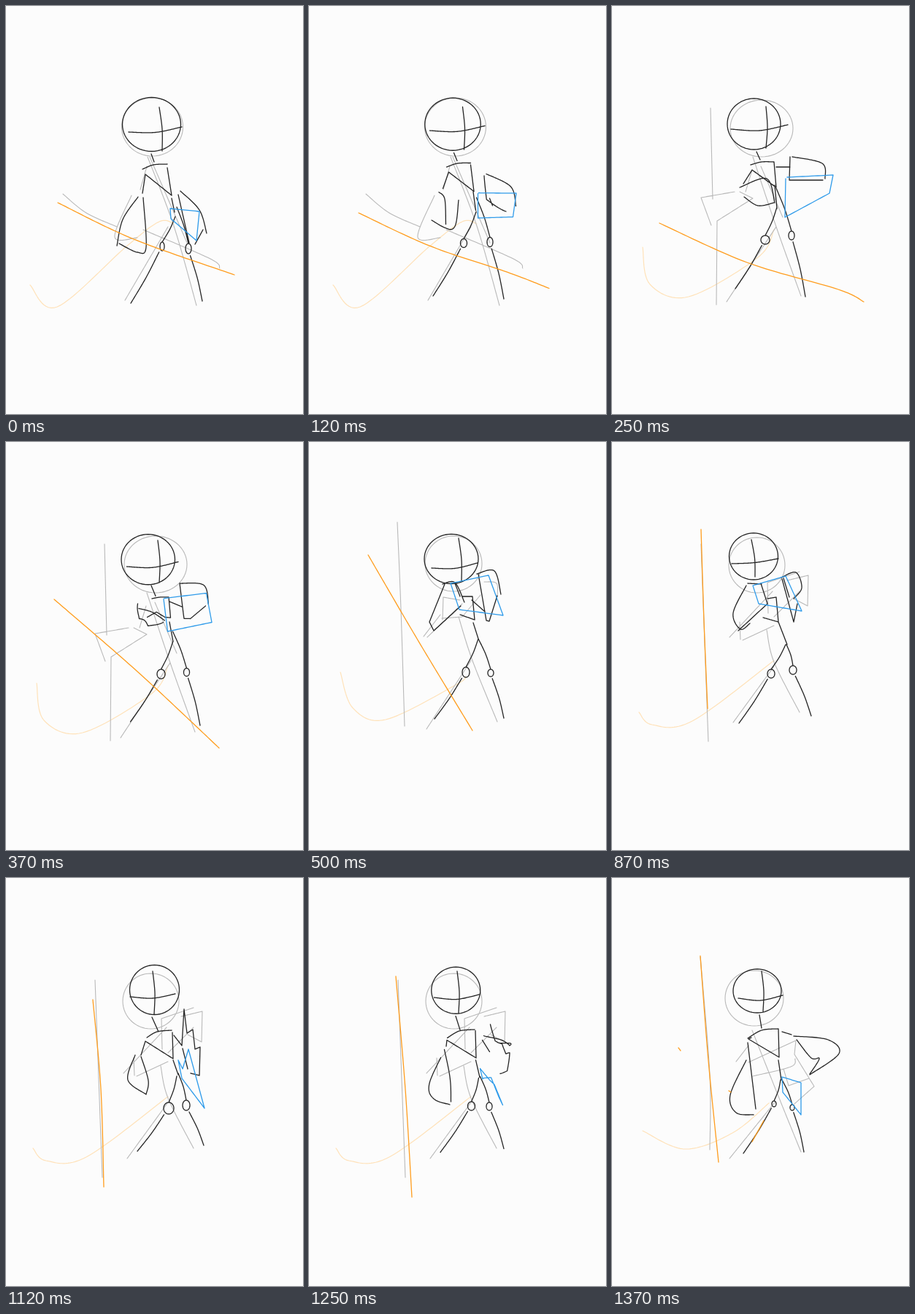
These frames come from a looping animation (407x560 px, 1620 ms). An HTML page with a canvas:

```html
<!DOCTYPE html>
<html lang="en">
<head>
<meta charset="utf-8">
<title>Walking sketch</title>
<style>
  html, body { margin: 0; width: 100%; height: 100%; overflow: hidden; background: #fcfcfc; }
  canvas { display: block; }
</style>
</head>
<body>
<canvas id="stage" width="407" height="560"></canvas>
<script>
const ctx = document.getElementById('stage').getContext('2d');
const LOOP = 1620;
const INK = '#242424', GREY = '#b9b9b9', ORANGE = '#ff9d1e', PALE = '#ffe2b9', BLUE = '#2f9bea';

// A stroke is a function that gives the point at u, from 0 to 1.
const mix = (a, b, t) => [a[0] + (b[0] - a[0]) * t, a[1] + (b[1] - a[1]) * t];

const ellipse = ([x, y, rx, ry]) => u =>
  [x + rx * Math.sin(u * 2 * Math.PI), y - ry * Math.cos(u * 2 * Math.PI)];

function along(points, straight) {
  const last = points.length - 1;
  return u => {
    const i = Math.min(Math.floor(u * last), last - 1), t = u * last - i;
    const p = k => points[Math.max(0, Math.min(last, k))];
    const [a, b, c, d] = [p(i - 1), p(i), p(i + 1), p(i + 2)];
    if (straight) return mix(b, c, t);
    return [0, 1].map(k => b[k] + t / 2 * (c[k] - a[k] +
      t * (2 * a[k] - 5 * b[k] + 4 * c[k] - d[k] + t * (3 * (b[k] - c[k]) + d[k] - a[k]))));
  };
}

function bowed(a, b, dx, dy) {
  const [x, y] = mix(a, b, 0.5);
  return along([a, [x + dx, y + dy], b]);
}

// Strokes are split by ";". "#" means straight sides, "@" an ellipse.
const strokes = text => text.split(';').map(part => {
  const n = part.match(/[\d.]+/g).map(Number);
  if (part[0] === '@') return ellipse(n);
  const points = [];
  for (let i = 0; i < n.length; i += 2) points.push([n[i], n[i + 1]]);
  return along(points, part[0] === '#');
});

function headStrokes(oval, [x1, y1, x2, y2, sag], [x3, y3, x4, y4]) {
  return [ellipse(oval), bowed([x1, y1], [x2, y2], 0, sag), bowed([x3, y3], [x4, y4], 2, 0)];
}

function legStrokes([hipX, hipY, x, y, rx, ry, footX, footY]) {
  const foot = [footX, footY];
  const shinTop = mix([x, y], foot, (ry + 3) / Math.hypot(footX - x, footY - y));
  return [bowed([hipX, hipY], [x, y - ry], 1.5, 0), ellipse([x, y, rx, ry]), bowed(shinTop, foot, 1.5, 0)];
}

const pose = p => ({
  ink: [...headStrokes(p.head, p.eyes, p.nose), ...legStrokes(p.left), ...legStrokes(p.right),
    ...strokes(p.body), ...strokes(p.arms)],
  blue: strokes(p.blue),
  sword: strokes(p.sword)
});

const blend = (a, b) => a.map((stroke, i) => u => mix(stroke(u), b[i](u), 0.5));
const between = (a, b, sword) => ({
  ink: blend(a.ink, b.ink),
  blue: blend(a.blue, b.blue),
  sword: sword ? strokes(sword) : blend(a.sword, b.sword)
});

const start = pose({
  head: [199.5, 162.5, 40, 37], eyes: [168, 173, 241, 166, 4], nose: [210, 139, 214, 199],
  left: [232, 289, 214, 330, 3, 6, 171, 408],
  right: [234, 276, 250, 333, 4, 7, 269, 405],
  body: '199 203 203 214;187 224 202 218 221 217;#221 222 227 260 191 231 187 257;227 264 231 283',
  arms: '181 262 160 293 152 329;155 326 180 338 192 331 188 263;239 254 265 280 275 312;236 259 251 325;270 307 259 327',
  blue: '#225 278 265 282 261 322 226 292 225 278',
  sword: '71 270 175 320 313 369'
});

const swing = pose({
  head: [194.5, 162, 36.5, 35], eyes: [163, 169, 241, 163, 5], nose: [211, 138, 211, 195],
  left: [226, 276, 210, 321, 6, 6, 169, 388],
  right: [225, 250, 246, 315, 4, 6, 265, 399],
  body: '198 200 203 211;190 218 205 214 222 214;#222 214 225 249 192 225 180 244;223 246 226 278',
  arms: '175 249 212 237 223 270;181 262 200 274 222 270;247 207 288 216 292 237;#244 207 243 239 289 239;225 221 244 221',
  blue: '#240 235 303 232 298 257 237 290 238 237',
  sword: '65 298 185 352 310 389 345 406'
});

const raise = pose({
  head: [195, 160.5, 37, 34], eyes: [168, 173, 231, 166, 4], nose: [205, 132, 209, 191],
  left: [232, 270, 215, 316, 5, 7, 172, 380],
  right: [232, 270, 249, 317, 4, 5, 267, 379],
  body: '200 194 207 212;210 212 224 212;#224 212 227 244 207 237;225 248 232 270',
  arms: '#186 195 165 247 171 259 208 225;183 195 200 193 213 220;230 181 254 177 263 209;#232 181 243 245 247 246 258 211;223 217 240 232',
  blue: '#194 194 246 183 266 238 206 230 194 194',
  sword: '81 155 148 270 224 396'
});

const guard = pose({
  head: [199.5, 157.5, 35, 33], eyes: [167, 168, 235, 161, 9], nose: [202, 134, 205, 193],
  left: [233, 280, 217, 319, 3, 5, 181, 375],
  right: [240, 276, 252, 314, 5, 8, 272, 374],
  body: '184 193 197 187 206 193;211 215 230 215;#230 215 228 246 208 239;227 246 239 278',
  arms: '#187 200 176 220 172 253 213 219;203 192 213 219;233 179 254 179 258 213;#232 190 244 239 253 222;#258 213 243 213 233 181',
  blue: '#189 193 242 181 263 237 198 221 189 193',
  sword: '122 140 128 255 131 390'
});

const hold = pose({
  head: [194, 157, 33.5, 32], eyes: [164, 167, 228, 160, 2], nose: [191, 134, 196, 185],
  left: [238, 278, 218, 318, 5, 6, 174, 386],
  right: [239, 278, 248, 313, 5, 6, 273, 376],
  body: '186 194 205 195;213 215 225 213;#225 213 228 247 207 241;228 247 240 278',
  arms: '184 197 166 235 176 257 189 249;#173 259 213 222 204 194;232 186 252 179 260 200 249 215;#233 188 249 247 254 222;235 187 243 213',
  blue: '#193 197 238 184 260 232 201 222 193 197',
  sword: '122 120 126 245 131 366'
});

const lower = pose({
  head: [203.5, 153.5, 34, 34], eyes: [170, 163, 232, 159, 4], nose: [201, 128, 203, 187],
  left: [234, 272, 223, 316, 7, 8, 180, 375],
  right: [236, 268, 247, 312, 5, 7, 271, 367],
  body: '200 191 209 211;193 219 207 211 227 209;#228 212 229 248 191 224 185 243;229 250 236 270',
  arms: '177 243 167 277 192 297;185 245 195 278 192 297;#244 180 248 213 256 208 259 235 266 232 265 271 253 268;#230 216 241 230 244 180;242 234 249 262',
  blue: '#236 250 241 275 272 316 250 235 242 262 236 250',
  sword: '119 167 130 290 134 424'
});

const rest = pose({
  head: [199, 155, 33, 30], eyes: [173, 165, 234, 161, 5], nose: [205, 128, 207, 183],
  left: [231, 277, 222, 310, 3, 4, 180, 378],
  right: [233, 277, 247, 315, 3, 4, 263, 376],
  body: '202 188 205 206;186 220 205 209 227 207;#228 207 229 246 187 221 191 219;228 250 232 277',
  arms: '184 250 162 298 170 322 194 325;186 226 197 317;253 222 273 247 284 248 271 269;249 217 296 222 311 241 271 270;233 211 246 215',
  blue: '#233 273 259 281 259 325 234 294 233 273',
  sword: '121 107 132 250 146 390;208 333 192 362;160 292 163 294;91 233 94 237'
});

const rough = (lines, trail) => ({ lines: strokes(lines), trail: strokes(trail) });

const roughStart = rough(
  '@200.5 166 42 40;194 207 230 302 261 411;197 207 248 325;222 303 163 404;193 220 184 252;' +
  '172 260 149 317 180 318;78 258 110 284 152 303;188 307 280 347 293 360',
  '33 383 70 413 165 330 210 296 230 299');

const roughSwing = rough(
  '@205 168 43 39;135 140 138 265;144 295 143 410;#168 255 122 263 136 301;#175 255 193 264 144 295;' +
  '193 207 225 303 259 398;192 225 183 255;204 220 234 290;225 303 157 406',
  '42 331 52 382 105 399 200 345 222 307');

const roughRaise = rough(
  '@198 167 39 38;121 110 126 230 131 390;205 240 224 300 258 384;222 300 161 394;157 267 180 237;' +
  '162 268 210 222;#183 244 184 213 207 217;#182 242 210 240 235 210;240 192 257 194 258 212',
  '43 316 60 365 105 381 200 334 215 322');

const roughHold = rough(
  '@198.5 169 38.5 38;122 140 132 411;212 258 222 302 257 371;222 308 166 385;161 268 220 205;' +
  '175 247 176 271;179 272 222 252;#214 235 213 193 257 178;222 240 257 205;#240 190 269 183 268 225 249 215',
  '37 371 55 388 110 383 222 300');

const roughRest = rough(
  '@195 165 40 38;192 209 229 302 259 376;223 308 161 385;121 108 134 270 134 373;170 252 187 230;' +
  '#187 253 252 223 250 242 277 286 250 310;193 272 245 259 251 248;#235 262 242 285 270 275',
  '42 347 100 372 165 350 215 309');

const timeline = [
  { from: 0, layer: roughStart, figure: start },
  { from: 120, layer: roughStart, figure: between(start, swing) },
  { from: 250, layer: roughSwing, figure: swing },
  { from: 370, layer: roughSwing, figure: between(swing, raise, '66 216 180 315 292 420') },
  { from: 500, layer: roughRaise, figure: raise },
  { from: 620, layer: roughRaise, figure: between(raise, guard) },
  { from: 750, layer: roughRaise, figure: guard },
  { from: 870, layer: roughHold, figure: hold },
  { from: 1120, layer: roughHold, figure: lower },
  { from: 1250, layer: roughHold, figure: between(lower, rest, '119 135 132 290 141 438') },
  { from: 1370, layer: roughRest, figure: rest }
];

function draw(list, color, width) {
  const steps = 60;
  ctx.strokeStyle = color;
  ctx.lineWidth = width;
  ctx.beginPath();
  for (const stroke of list) {
    ctx.moveTo(...stroke(0));
    for (let i = 1; i <= steps; i++) ctx.lineTo(...stroke(i / steps));
  }
  ctx.stroke();
}

function render() {
  const time = performance.now() % LOOP;
  const { layer, figure } = timeline.findLast(({ from }) => time >= from);
  ctx.fillStyle = '#fcfcfc';
  ctx.fillRect(0, 0, 407, 560);
  draw(layer.trail, PALE, 1.2);
  draw(layer.lines, GREY, 1.1);
  draw(figure.ink, INK, 1.3);
  draw(figure.blue, BLUE, 1.3);
  draw(figure.sword, ORANGE, 1.3);
  requestAnimationFrame(render);
}

ctx.lineCap = ctx.lineJoin = 'round';
render();
</script>
</body>
</html>
```
